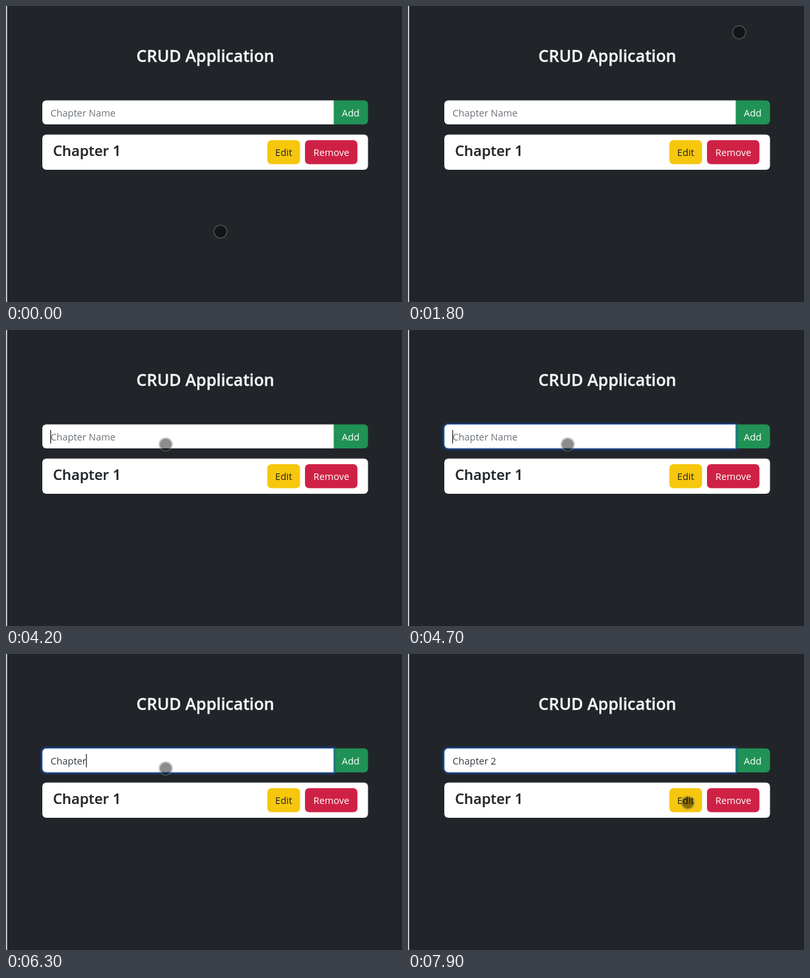
Animation of 600x450 px, one loop 8000 ms. Source, as an HTML page:

```html
<!DOCTYPE html>
<html lang="en">
<head>
<meta charset="utf-8">
<title>CRUD Application</title>
<style>
  html, body { margin: 0; width: 100%; height: 100%; overflow: hidden; background: #212529; }
  svg { display: block; width: 600px; height: 450px; }
  text { font: 14.5px "Open Sans", "Noto Sans", sans-serif; white-space: pre; }
  .mid { text-anchor: middle; }
  .light { fill: #fff; }
  .dark { fill: #212529; }
  .title { font-size: 24.7px; font-weight: 600; fill: #f8f9fa; stroke: #f8f9fa; stroke-width: .3px; }
  .item { font-size: 21.9px; font-weight: 600; stroke: #212529; stroke-width: .2px; }
</style>
</head>
<body>
<svg viewBox="0 0 600 450">
  <rect width="600" height="450" fill="#212529"/>
  <rect width="1.6" height="450" fill="#e4e7ea"/>
  <text class="title mid" x="302" y="85">CRUD Application</text>

  <path d="M496 143.500h46.500a6 6 0 0 1 6 6v24.500a6 6 0 0 1-6 6H496z" fill="#209255"/>
  <path id="glow" d="M61 143.500H497V180H61a6 6 0 0 1-6-6v-24.500a6 6 0 0 1 6-6z"
        fill="none" stroke="#0d50c4" stroke-opacity=".32" stroke-width="6.500" stroke-linejoin="round"/>
  <path id="field" d="M61 143.500H496.500V180H61a6 6 0 0 1-6-6v-24.500a6 6 0 0 1 6-6z" fill="#fff" stroke="#5f8fd6"/>
  <text id="hint" x="67.400" y="168" fill="#6a7077">Chapter Name</text>
  <text id="value" x="67.400" y="168" fill="#343a40"></text>
  <rect id="caret" y="152" width="1.2" height="20.500" fill="#212529"/>
  <text class="light mid" x="522.300" y="168">Add</text>

  <rect x="55" y="195.500" width="493.500" height="53.500" rx="6" fill="#fff"/>
  <text class="item dark" x="71.200" y="228">Chapter 1</text>
  <rect x="396" y="204" width="49.500" height="36.500" rx="6" fill="#f7c70d"/>
  <text class="dark mid" x="420.700" y="228.300">Edit</text>
  <rect x="453" y="204" width="79.500" height="36.500" rx="6" fill="#cf2145"/>
  <text class="light mid" x="492.900" y="228.300">Remove</text>

  <g id="pointer">
    <circle r="9" fill-opacity=".45"/>
    <circle r="9.900" fill="none" stroke="#787878" stroke-opacity=".4" stroke-width="1.800"/>
  </g>
  <path id="mover" transform="translate(238.800 170.700)" stroke="#fff" stroke-width=".8" paint-order="stroke"
        d="M0-7.500 3-4H1V-1H4V-3L7.500 0 4 3V1H1V4H3L0 7.500-3 4H-1V1H-4V3L-7.500 0-4-3V-1H-1V-4H-3z"/>
</svg>
<script>
const LOOP = 8000, FOCUS = 4200, BLINK = 530;
const MOVER_ON = 4950, MOVER_OFF = 5450;
const TYPED = 'Chapter 2';
const KEY_TIMES = [5600, 5710, 5820, 5930, 6040, 6150, 6260, 6550, 6900];

// Pointer path: time, x, y
const PATH = [
  [0, 325, 343], [400, 400, 270], [900, 466, 170], [1300, 553, 60], [1500, 540, 21],
  [1800, 502, 40], [2300, 330, 120], [2650, 242, 174], [7000, 242, 174], [7900, 424, 226]
];

const [glow, field, hint, value, caret, pointer, mover] =
  ['glow', 'field', 'hint', 'value', 'caret', 'pointer', 'mover'].map(id => document.getElementById(id));
const show = (el, on) => el.setAttribute('visibility', on ? 'visible' : 'hidden');

const rate = (i, axis) => (PATH[i + 1][axis] - PATH[i][axis]) / (PATH[i + 1][0] - PATH[i][0]);

// Harmonic mean keeps the curve free of overshoot
function slope(i, axis) {
  if (i === 0 || i === PATH.length - 1) return 0;
  const a = rate(i - 1, axis), b = rate(i, axis);
  return a * b > 0 ? 2 * a * b / (a + b) : 0;
}

function along(t, axis) {
  const last = PATH.length - 1;
  if (t >= PATH[last][0]) return PATH[last][axis];
  const i = PATH.findIndex((p, k) => t < PATH[k + 1][0]);
  const span = PATH[i + 1][0] - PATH[i][0], u = (t - PATH[i][0]) / span, v = 1 - u;
  return v * v * (1 + 2 * u) * PATH[i][axis] + u * u * (3 - 2 * u) * PATH[i + 1][axis]
    + span * u * v * (v * slope(i, axis) - u * slope(i + 1, axis));
}

function draw(t) {
  const focus = Math.min(1, Math.max(0, (t - FOCUS) / 150));
  glow.setAttribute('opacity', focus);
  field.setAttribute('stroke-opacity', focus);

  const count = KEY_TIMES.filter(k => k <= t).length;
  value.textContent = TYPED.slice(0, count);
  show(hint, !count);
  const lastKey = count ? KEY_TIMES[count - 1] : FOCUS;
  show(caret, t >= FOCUS && (t - lastKey) % (2 * BLINK) < BLINK);
  caret.setAttribute('x', 67 + (count ? value.getComputedTextLength() : 0));

  const moving = t >= MOVER_ON && t < MOVER_OFF;
  show(mover, moving);
  show(pointer, !moving);
  pointer.setAttribute('transform', `translate(${along(t, 1)} ${along(t, 2)})`);
}

function tick() {
  draw(performance.now() % LOOP);
  requestAnimationFrame(tick);
}
tick();
</script>
</body>
</html>
```
